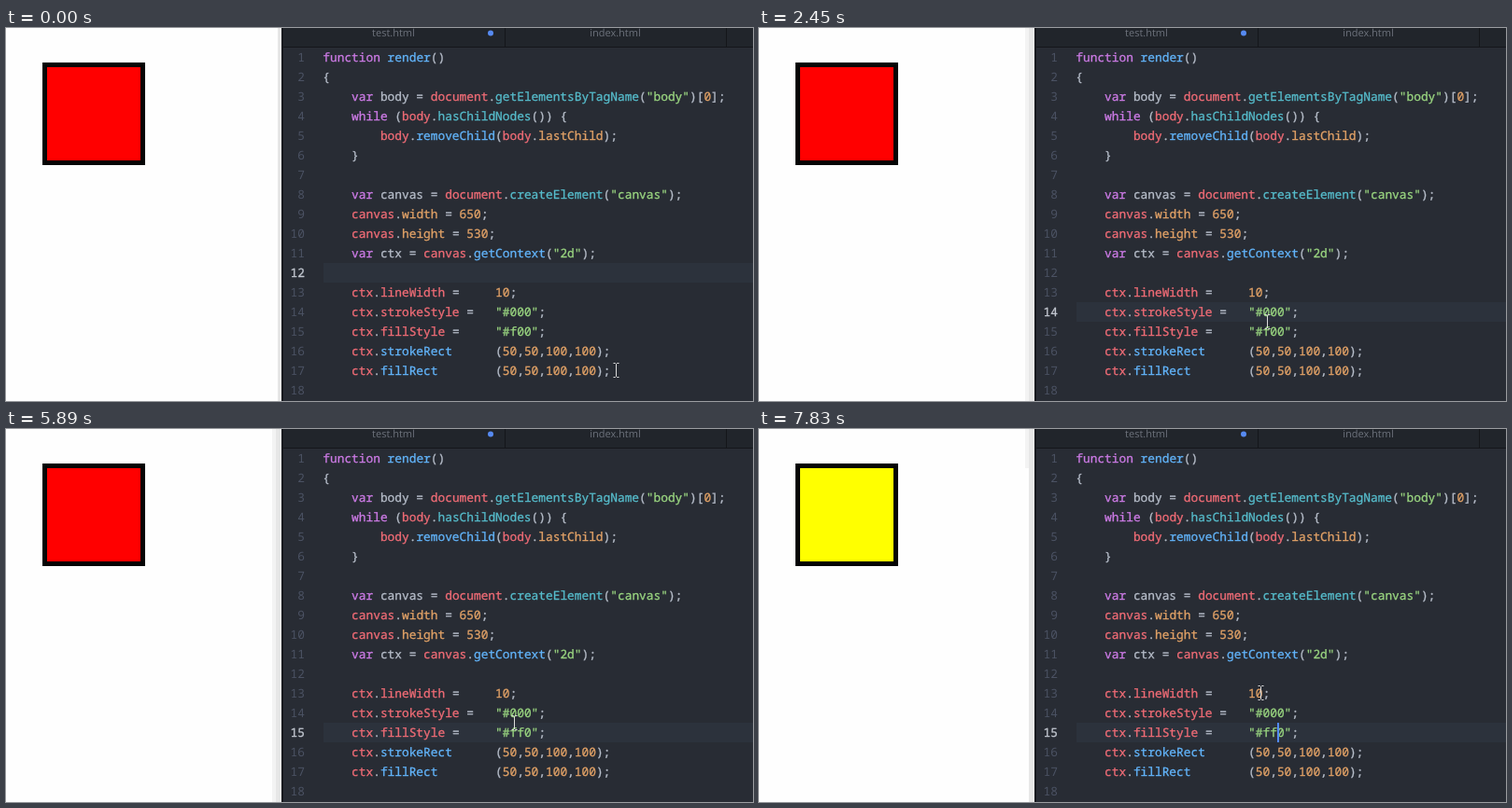
Animation, 800 px wide and 400 px high, one loop 8 s. Source, as an HTML page:

```html
<!DOCTYPE html>
<html lang="en">
<head>
<meta charset="utf-8">
<title>Canvas live edit</title>
<style>
html, body { margin: 0; width: 100%; height: 100%; overflow: hidden; background: #fefefe; }
svg { display: block; width: 800px; height: 400px; }
text { text-rendering: geometricPrecision; white-space: pre; fill: currentColor; }
#code text {
  font: 12.83px "Noto Sans Mono", "DejaVu Sans Mono", monospace;
  stroke: currentColor;
  stroke-width: .3px;
}
#code .num { text-anchor: end; color: #4b5263; stroke: none; }
#code .num.on { color: #c3c8d1; stroke: currentColor; }
.tab { font: 11px "Open Sans", "Noto Sans", sans-serif; color: #6d727c; text-anchor: middle; }
</style>
</head>
<body>
<svg viewBox="0 0 800 400">
  <rect width="800" height="400" fill="#fefefe"/>
  <rect id="square" x="41.5" y="39.5" width="105" height="105" stroke="#050505" stroke-width="5"/>
  <rect id="track" x="285" width="4" fill="#f3f3f3"/>
  <rect id="bar" width="8" height="400" fill="#e7e7e7"/>
  <rect x="295" width="2" height="400" fill="#181a1f"/>
  <rect x="297" width="503" height="400" fill="#282c34"/>
  <rect x="297" width="503" height="20" fill="#21252b"/>
  <path d="M297 20.5H800M534.5 0V20M771.5 0V20" stroke="#14161a"/>
  <text class="tab" x="415" y="9">test.html</text>
  <text class="tab" x="652.5" y="9">index.html</text>
  <circle cx="519" cy="5.5" r="3" fill="#568af2"/>
  <rect id="active" x="340" width="460" height="21" fill="#2c323c"/>
  <rect id="select" x="547.5" y="315" width="7.5" height="21" fill="#3e4451"/>
  <g id="code"></g>
  <rect id="caret" width="2" height="21" fill="#528bff"/>
  <path id="mouse" d="M-3-7.5H-1L0-6.5L1-7.5H3M0-6.5V6.5M-3 7.5H-1L0 6.5L1 7.5H3" fill="none" stroke="#dcdcdc"/>
</svg>
<script>
const LOOP = 8000, BLINK = 410, LEFT = 339.3, CHAR = 7.7, ROW = 21;
const $ = id => document.getElementById(id);
const colors = { p: '#cd7be6', b: '#62b4fa', r: '#f06c76', c: '#56bccb', s: '#9ad680', n: '#e2a267' };

// <key:text> marks a coloured token
const lines = `<p:function> <b:render>()
{
    <p:var> body = <r:document>.<c:getElementsByTagName>(<s:"body">)[<n:0>];
    <p:while> (<r:body>.<c:hasChildNodes>()) {
        <r:body>.<b:removeChild>(<r:body>.<n:lastChild>);
    }

    <p:var> canvas = <r:document>.<c:createElement>(<s:"canvas">);
    <r:canvas>.<n:width> = <n:650>;
    <r:canvas>.<n:height> = <n:530>;
    <p:var> ctx = <r:canvas>.<b:getContext>(<s:"2d">);

    <r:ctx>.<r:lineWidth> =     <n:10>;
    <r:ctx>.<r:strokeStyle> =   <s:"#000">;
    <r:ctx>.<r:fillStyle> =     <s:"#f00">;
    <r:ctx>.<b:strokeRect>      (<n:50>,<n:50>,<n:100>,<n:100>);
    <r:ctx>.<b:fillRect>        (<n:50>,<n:50>,<n:100>,<n:100>);
`.split('\n');

function addText(x, row, str, color) {
  const el = document.createElementNS('http://www.w3.org/2000/svg', 'text');
  el.setAttribute('x', x);
  el.setAttribute('y', row * ROW + 15);
  el.textContent = str;
  if (color) el.style.color = color;
  return $('code').appendChild(el);
}

let fillText;
const numbers = lines.map((line, i) => {
  const row = i + 1;
  let col = 0;
  for (const [all, key, word] of line.matchAll(/<(\w):([^>]*)>|[^<]+/g)) {
    const str = word || all, shown = str.trim();
    if (shown) {
      const x = LEFT + (col + str.indexOf(shown)) * CHAR;
      const el = addText(x, row, shown, colors[key] || '#b6bdc9');
      if (shown === '"#f00"') fillText = el;
    }
    col += str.length;
  }
  const num = addText(320, row, row);
  num.classList.add('num');
  return num;
});

// Each action keeps the state of the one before and restarts the caret blink
const actions = [
  { t: 0, row: 12, col: 0, caret: false, color: '#f00', square: '#f00' },
  { t: 2020, row: 14, col: 26, caret: true },
  { t: 2850, row: 15 },
  { t: 3260, col: 27 },
  { t: 3780, caret: false, selected: true },
  { t: 4240, color: '#ff0', selected: false },
  { t: 4650, col: 28, caret: true },
  { t: 6190, square: '#ff0' }
];

// Turning points of the mouse, eased out between
const route = [
  { t: 530, x: 653.5, y: 367 },
  { t: 650, x: 597, y: 297 },
  { t: 1200, x: 600, y: 273 },
  { t: 1740, x: 544.5, y: 315 },
  { t: 7040, x: 544.5, y: 315 },
  { t: 7450, x: 524.5, y: 277 },
  { t: 7830, x: 537.5, y: 283 }
];

function mouseAt(t) {
  const next = route.findIndex(p => p.t > t);
  if (next === 0) return route[0];
  if (next < 0) return route.at(-1);
  const a = route[next - 1], b = route[next];
  const k = Math.sin((t - a.t) / (b.t - a.t) * Math.PI / 2);
  return { x: a.x + (b.x - a.x) * k, y: a.y + (b.y - a.y) * k };
}

const set = (id, attrs) => {
  for (const k in attrs) $(id).setAttribute(k, attrs[k]);
};

function draw(t) {
  const s = Object.assign({}, ...actions.filter(a => a.t <= t));
  const lit = s.caret && Math.floor((t - s.t) / BLINK) % 2 === 0;
  const m = mouseAt(t);
  const hover = t >= 1860, saved = s.square === '#ff0';

  set('mouse', { transform: `translate(${Math.round(m.x - .5) + .5} ${Math.round(m.y)})` });
  set('caret', { x: Math.round(LEFT + s.col * CHAR), y: s.row * ROW, opacity: lit ? 1 : 0 });
  set('active', { y: s.row * ROW });
  set('select', { opacity: s.selected ? 1 : 0 });
  set('square', { fill: s.square });
  set('track', { height: saved ? 42 : hover ? 400 : 0 });
  set('bar', { x: hover ? 289 : 291 });
  numbers.forEach((el, i) => el.classList.toggle('on', i + 1 === s.row));
  fillText.textContent = `"${s.color}"`;
}

const start = performance.now();
function tick() {
  draw((performance.now() - start) % LOOP);
  requestAnimationFrame(tick);
}
tick();
</script>
</body>
</html>
```
